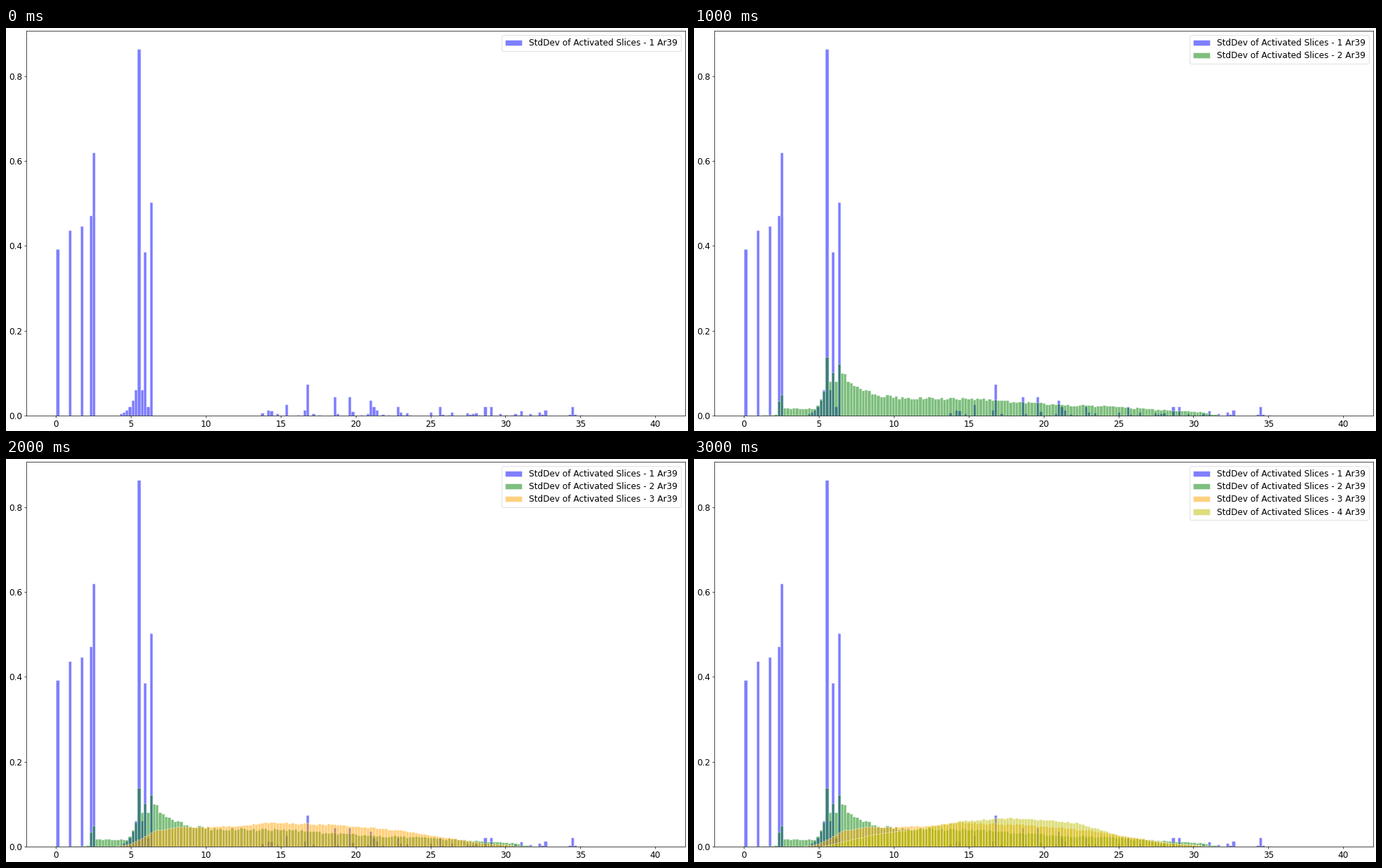
A matplotlib script that plays this animation: 973 px wide and 576 px high, repeating every 4000 ms.

```python
import matplotlib.pyplot as plt
import numpy as np
from matplotlib.animation import FuncAnimation

W, H, DPI = 973, 576, 64
PX = 72 / DPI  # one pixel in points
LEFT, RIGHT, TOP, BOTTOM = 28.6, 968.9, 4.1, 554.2
X_MAX, BINS = 40, 199
EDGES = np.linspace(0, X_MAX, BINS + 1)
CENTERS = (EDGES[:-1] + EDGES[1:]) / 2
INDEX = np.arange(BINS)

plt.rcParams.update({
    "font.family": "DejaVu Sans",
    "font.size": 12.1 * PX,
    "axes.linewidth": 0.7 * PX,
    "patch.linewidth": 0.76 * PX,
    "legend.labelspacing": 0.43,
})
for axis in ("xtick", "ytick"):
    plt.rcParams.update({f"{axis}.major.size": 2.7 * PX,
                         f"{axis}.major.pad": 2.7 * PX,
                         f"{axis}.major.width": 0.7 * PX})


def spikes(heights):
    result = np.zeros(BINS)
    for k, height in heights.items():
        result[k] = height
    return result


def outline(points, noise, seed):
    """Curve through (x, height) key points with slight jitter."""
    jitter = np.random.default_rng(seed).uniform(-noise, noise, BINS)
    return np.interp(CENTERS, *zip(*points)) * (1 + jitter)


def sparse_tail(first, last, mean, seed):
    """Short bars scattered over a range of bins."""
    rng = np.random.default_rng(seed)
    heights = np.minimum(rng.exponential(mean, BINS), 3 * mean)
    shown = (rng.random(BINS) < 0.5) & (INDEX >= first) & (INDEX <= last)
    return heights * shown


peaks = spikes({0: 0.393, 4: 0.437, 8: 0.446, 11: 0.471, 12: 0.619,
                27: 0.863, 29: 0.385, 31: 0.503})
tall_tail = spikes({76: 0.027, 83: 0.074, 92: 0.045, 97: 0.045, 104: 0.037})
cluster = 0.1 * np.exp(-np.abs(INDEX - 27) / 2) * (np.abs(INDEX - 27) <= 6)
cluster[INDEX > 30] = 0

one = np.maximum.reduce([peaks, tall_tail, cluster,
                         sparse_tail(66, 174, 0.007, 8)])

# The second series repeats the main peaks faintly on top of its own curve.
two = 0.065 * peaks * (CENTERS > 2) + outline(
    [(0.8, 0), (2.4, 0.004), (2.7, 0.017), (4.8, 0.017), (5.1, 0.037),
     (5.6, 0.084), (6.1, 0.08), (6.7, 0.1), (7.1, 0.074), (9, 0.048),
     (11, 0.041), (15.5, 0.041), (18, 0.034), (22, 0.025), (24.5, 0.023),
     (27, 0.016), (30.5, 0.009), (32, 0)], 0.08, 4)

three = outline(
    [(3.8, 0), (5, 0.007), (6.6, 0.038), (8.1, 0.046), (11.5, 0.048),
     (14, 0.057), (18.6, 0.053), (23, 0.039), (26, 0.022), (28.5, 0.009),
     (31.5, 0)], 0.035, 2)

four = outline(
    [(5, 0), (6, 0.007), (8.8, 0.03), (11.6, 0.043), (15.1, 0.063),
     (17.8, 0.068), (20.5, 0.063), (22.4, 0.055), (25, 0.027), (28, 0.01),
     (31.5, 0)], 0.03, 3)

fig = plt.figure(figsize=(W / DPI, H / DPI), dpi=DPI, facecolor="white")
ax = fig.add_axes([LEFT / W, 1 - BOTTOM / H,
                   (RIGHT - LEFT) / W, (BOTTOM - TOP) / H])
series = [
    ax.bar(EDGES[:-1], heights, width=X_MAX / BINS, align="edge", color=color,
           edgecolor="white", alpha=0.5,
           label=f"StdDev of Activated Slices - {n} Ar39")
    for n, (heights, color) in enumerate(
        [(one, "blue"), (two, "green"), (three, "orange"), (four, "y")], 1)
]
ax.set_xlim(-2, X_MAX + 2)
ax.set_ylim(0, one.max() * 1.05)
ax.set_xticks(range(0, X_MAX + 1, 5))
ax.set_yticks([0, 0.2, 0.4, 0.6, 0.8])


def update(i):
    for n, bars in enumerate(series):
        for bar in bars:
            bar.set_visible(n <= i)
    ax.legend(handles=series[:i + 1], loc="upper right")
    return []


anim = FuncAnimation(fig, update, frames=len(series),
                     init_func=lambda: update(0),
                     interval=1000, repeat=True, repeat_delay=0)
plt.show()
```
